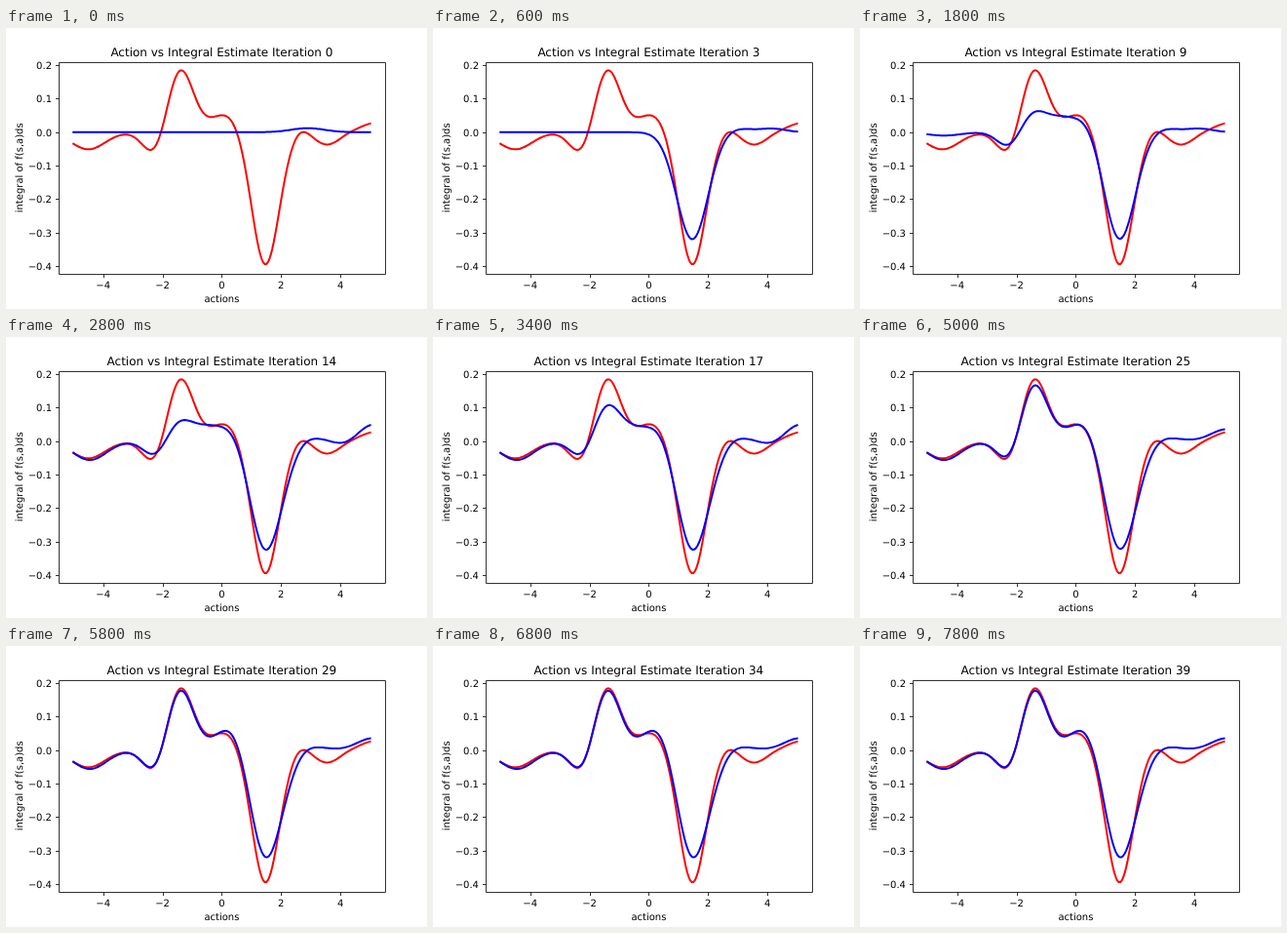
Recreate the animation shown at these times as an HTML page. Size 432 by 288 pixels, loop 8 s.

```html
<!DOCTYPE html>
<html lang="en">
<head>
<meta charset="utf-8">
<title>Action vs Integral Estimate</title>
<style>
  html, body { margin: 0; width: 100%; height: 100%; overflow: hidden; background: #fff; }
  svg { display: block; width: 432px; height: 288px; }
  text { font: 10px "DejaVu Sans", sans-serif; text-anchor: middle; text-rendering: geometricPrecision; }
  #title { font-size: 12px; }
  .y { text-anchor: end; }
  .axis { fill: none; stroke: #000; stroke-width: .8; }
  .curve { fill: none; stroke-width: 2; stroke-linecap: square; stroke-linejoin: round; }
</style>
</head>
<body>
<svg viewBox="0 0 432 288">
  <g id="ticks"></g>
  <path id="truth" class="curve" stroke="#f00"/>
  <path id="estimate" class="curve" stroke="#00f"/>
  <path class="axis" d="M54.5 35.5H389.5V252.5H54.5Z"/>
  <text id="title" x="221.4" y="29"></text>
  <text x="221.4" y="281">actions</text>
  <text transform="translate(17 143.3) rotate(-90)">integral of f(s,a)ds</text>
</svg>
<script>
const STEP = 200, COUNT = 40;
const $ = id => document.getElementById(id);
const px = a => 221.4 + 30.436 * a;
const py = v => 106.8 - 343.2 * v;

// Both curves are sums of Gaussian bumps.
const bump = (center, width, height) => ({ center, width, height });
const truth = [
  bump(-4.5, .8, -.051),
  bump(-2.25, .55, -.072),
  bump(-1.4, .62, .19),
  bump(.15, .75, .054),
  bump(1.47, .65, -.397),
  bump(2.65, .4, .016),
  bump(3.55, .6, -.037),
  bump(5.3, .8, .03)
];

// Heights here are keyed by iteration and change linearly between keys.
const estimate = [
  bump(-4.45, .8, { 3: 0, 9: -.01, 12: -.01, 14: -.056 }),
  bump(-2.25, .55, { 3: 0, 9: -.045, 14: -.045, 29: -.069 }),
  bump(-1.4, .62, { 3: 0, 9: .06, 14: .06, 20: .155, 29: .183 }),
  bump(-.55, .6, { 3: 0, 9: .03, 14: .03, 29: 0 }),
  bump(.4, .78, { 3: 0, 9: .045, 20: .05, 29: .08 }),
  bump(1.47, .75, { 0: 0, 3: -.32, 14: -.33 }),
  bump(2.25, .5, { 9: 0, 12: -.018 }),
  bump(2.9, .8, { 0: .012 }),
  bump(4.2, .6, { 0: 0, 3: .01, 9: .01, 12: -.014, 20: -.014, 24: 0 }),
  bump(5.1, .75, { 9: 0, 12: .051, 20: .051, 24: .036 })
];

function heightAt(keys, n) {
  const times = Object.keys(keys).map(Number);
  const next = times.findIndex(t => t > n);
  if (next === 0) return keys[times[0]];
  if (next < 0) return keys[times[times.length - 1]];
  const t0 = times[next - 1], t1 = times[next];
  return keys[t0] + (keys[t1] - keys[t0]) * (n - t0) / (t1 - t0);
}

function curvePath(bumps) {
  const points = [];
  for (let i = 0; i <= 200; i++) {
    const a = i / 20 - 5;
    const v = bumps.reduce((sum, b) => sum + b.height * Math.exp(-(((a - b.center) / b.width) ** 2)), 0);
    points.push(px(a).toFixed(2) + " " + py(v).toFixed(2));
  }
  return "M" + points.join("L");
}

const snap = p => Math.round(p) + .5;
const signed = s => String(s).replace("-", "\u2212");
let ticks = "";
for (let a = -4; a <= 4; a += 2) {
  ticks += `<path class="axis" d="M${snap(px(a))} 252.5v3.5"/><text x="${px(a)}" y="267">${signed(a)}</text>`;
}
for (let i = -4; i <= 2; i++) {
  const y = py(i / 10);
  ticks += `<path class="axis" d="M54.5 ${snap(y)}h-3.5"/><text class="y" x="47" y="${Math.round(y + 3.8)}">${signed((i / 10).toFixed(1))}</text>`;
}
$("ticks").innerHTML = ticks;
$("truth").setAttribute("d", curvePath(truth));

let shown = -1;
function draw() {
  const n = Math.floor(performance.now() / STEP) % COUNT;
  if (n !== shown) {
    shown = n;
    $("title").textContent = "Action vs Integral Estimate Iteration " + n;
    $("estimate").setAttribute("d", curvePath(estimate.map(b => ({ ...b, height: heightAt(b.height, n) }))));
  }
  requestAnimationFrame(draw);
}
draw();
</script>
</body>
</html>
```
